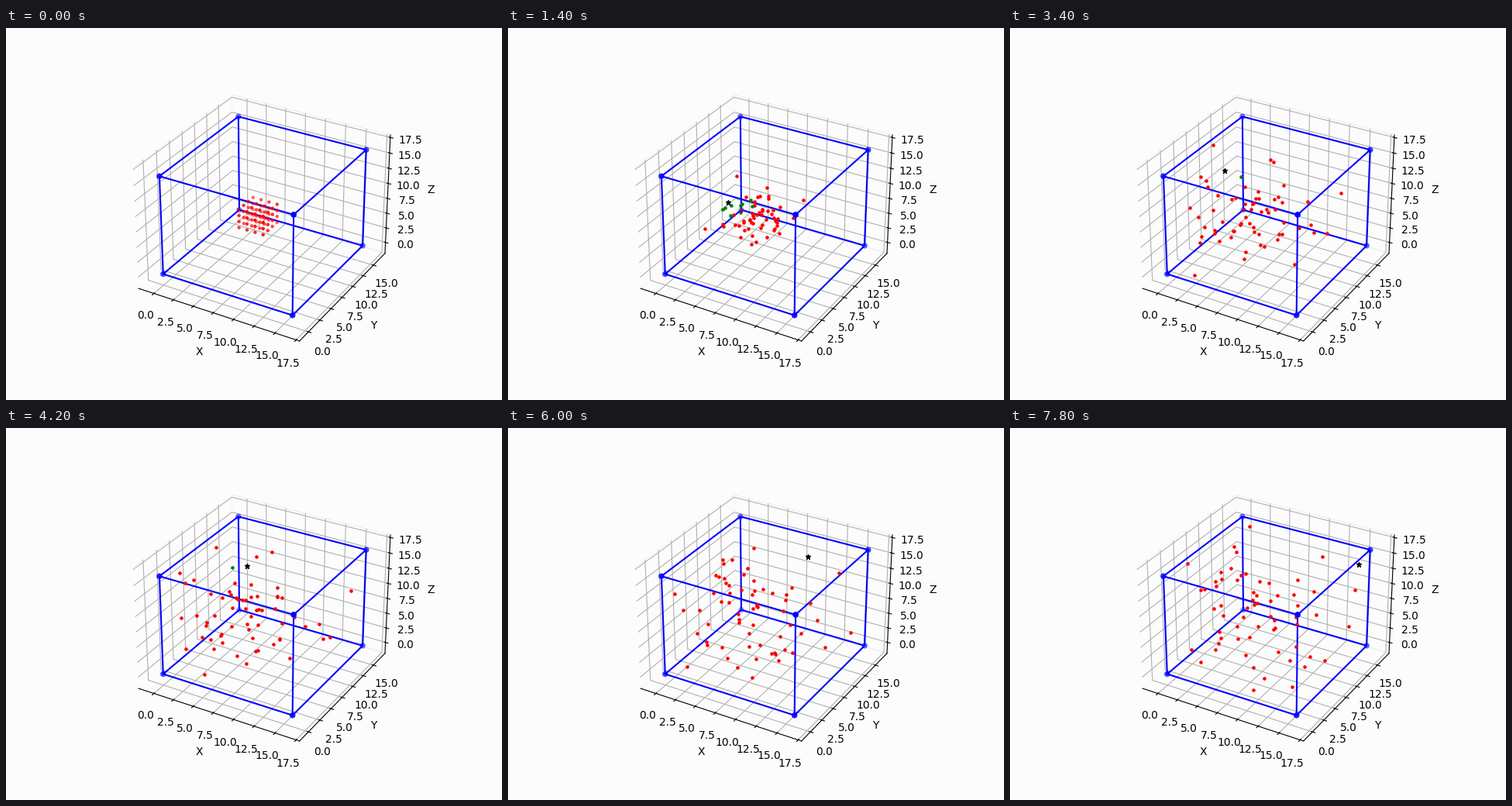
These frames come from a looping animation (640x480 px, 8 s). A matplotlib script:

```python
import itertools

import matplotlib.pyplot as plt
import numpy as np
from matplotlib.animation import FuncAnimation

SIDE = 16        # edge of the box
REACH = 3        # neighbours of the star turn green within this distance
SPEED = 1.38     # spread of the velocity along each axis, units per second
STEP = 0.2       # seconds per frame
FRAMES = 40
PAPER = "#fcfcfc"

# Axis limits, and the camera of the default 3D view: right, up, towards the eye
LOW = np.array([-1.98, -1.896, -1.896])
HIGH = np.full(3, 17.896)
UNIT = np.array([1.190476, 1.190476, 0.892857]) / (HIGH - LOW)
VIEW = np.array([[0.866025, 0.5, 0],
                 [-0.25, 0.433013, 0.866025],
                 [0.433013, -0.75, 0.5]])
EYE, ZOOM, MID_X, MID_Y = 10, 1997.8, 333.0, 237.4

# The star flies straight between these turns: time, screen x, screen y
TURN_T, TURN_X, TURN_Y = zip((0, 300, 257), (3.12, 265, 186),
                             (6.7, 417, 161), (7.8, 450, 176))


def lift(x, y):
    """Point of the data space seen at a pixel, on the plane through the middle."""
    flat = np.array([x - MID_X, MID_Y - y, 0]) * EYE / ZOOM
    return (LOW + HIGH) / 2 + flat @ VIEW / UNIT


def star_at(t):
    return lift(np.interp(t, TURN_T, TURN_X), np.interp(t, TURN_T, TURN_Y))


def bounce(p):
    """Fold a free path back into the box."""
    return SIDE - np.abs(p % (2 * SIDE) - SIDE)


lattice = np.array(list(itertools.product(range(6, 10), repeat=3)), float)
start = lattice[1:]     # the first site belongs to the star
velocity = np.random.default_rng(7).normal(0, SPEED, start.shape)

fig = plt.figure(figsize=(6.4, 4.8), dpi=100, facecolor=PAPER)
ax = fig.add_subplot(projection="3d", facecolor=PAPER)
for axis in (ax.xaxis, ax.yaxis, ax.zaxis):
    axis.pane.set_facecolor(PAPER)

corners = np.array(list(itertools.product((0, SIDE), repeat=3)))
for a, b in itertools.combinations(corners, 2):
    if np.count_nonzero(a != b) == 1:
        ax.plot(*zip(a, b), color="b")
ax.scatter(*corners.T, color="b")

block = ax.scatter(*lattice.T, color="r", marker=".", s=20)
far, = ax.plot([], [], [], "r.", markersize=4.6)
near, = ax.plot([], [], [], "g.", markersize=4.6)
star_mark, = ax.plot([], [], [], "k*", markersize=5)

xlim, ylim, zlim = zip(LOW, HIGH)
ax.set(xlim=xlim, ylim=ylim, zlim=zlim, yticks=np.arange(0, 16, 2.5),
       xlabel="X", ylabel="Y", zlabel="Z")


def draw(frame):
    t = frame * STEP
    star = star_at(t)
    dots = bounce(start + velocity * t)
    close = np.linalg.norm(dots - star, axis=1) < REACH
    far.set_data_3d(*dots[~close].T)
    near.set_data_3d(*dots[close].T)
    star_mark.set_data_3d(*star[:, None])

    # The resting block is shown before the particles are set free
    block.set_visible(frame == 0)
    for mark in (far, near, star_mark):
        mark.set_visible(frame > 0)
    return block, far, near, star_mark


anim = FuncAnimation(fig, draw, frames=FRAMES, interval=1000 * STEP,
                     init_func=lambda: draw(0), repeat=True, repeat_delay=0)
plt.show()
```
